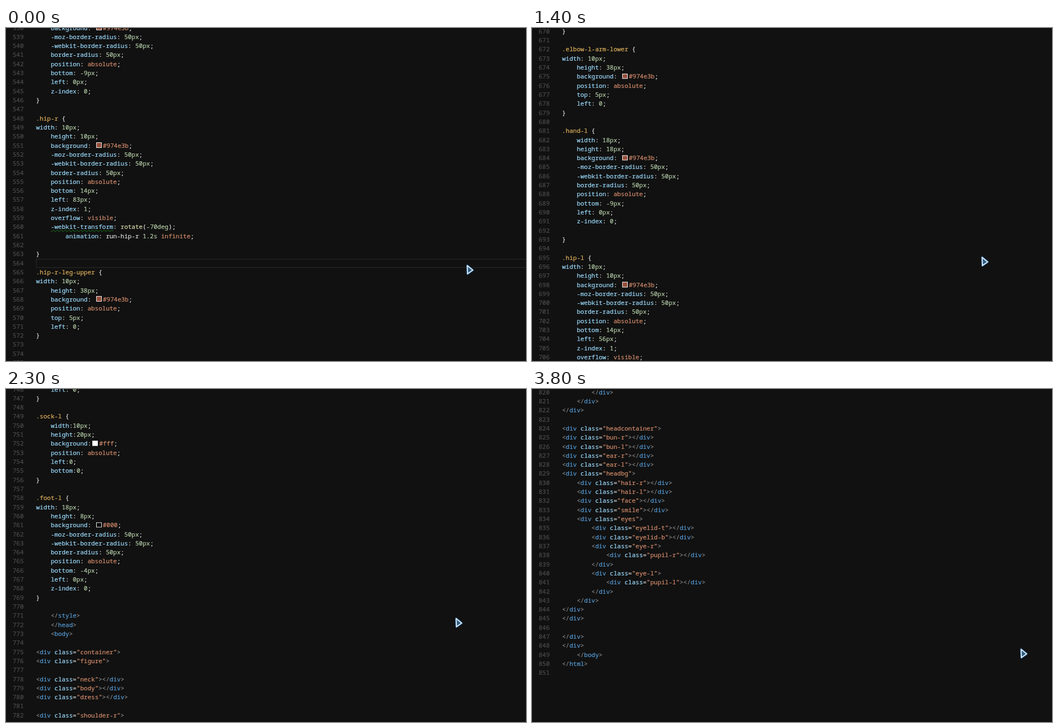
Animation of 934x600 px, one loop 3.9 s. Source, as an HTML page:

```html
<!DOCTYPE html>
<html>
<head>
<meta charset="utf-8">
<style>
html, body { margin: 0; width: 100%; height: 100%; overflow: hidden; background: #111; }
#stage { position: relative; width: 100%; height: 100%; overflow: clip; contain: strict; }
#code {
  position: absolute; left: 12px; right: 0; top: -8.5px;
  font: 500 11px "Noto Sans Mono", "DejaVu Sans Mono", monospace;
  color: #dcdcdc; white-space: pre; font-variant-ligatures: none;
  -webkit-text-stroke: .2px currentColor;
}
.row { position: relative; height: 16.314px; line-height: 16.314px; }
.no { display: inline-block; width: 42px; color: #4c4c4c; }
.current::after {
  content: ""; position: absolute; left: 42px; right: -2px; top: 0; bottom: 0;
  border: 1.5px solid #2a2a2a;
}
.sel { color: #e0b25c; }
.prop { color: #9cdcfe; }
.num { color: #b5cea8; }
.val { color: #d58d6c; }
.fn { color: #dcdcaa; }
.tag { color: #569cd6; }
.br { color: #808080; }
.warn { text-decoration: underline wavy #168016 1px; text-underline-offset: 1px; text-decoration-skip-ink: none; }
.chip {
  display: inline-block; box-sizing: border-box; width: 9.6px; height: 9.6px;
  margin: 0 2.4px; border: 1px solid #eee; vertical-align: 0;
}
#pointer { position: absolute; left: 0; top: 0; }
#pointer path { stroke-linejoin: round; }
</style>
</head>
<body>
<div id="stage">
  <div id="code"></div>
  <svg id="pointer" width="18" height="22">
    <path d="M2.5 3L12.5 11.3L3 18Z" fill="none" stroke="#1d4e7c" stroke-width="3.6"/>
    <path d="M2.5 3L12.5 11.3L3 18Z" fill="#2f5d80" stroke="#d3e8f8" stroke-width="2"/>
  </svg>
</div>
<script>
const FIRST = 538, CURRENT = 564, NOTCH = 42.932, LOOP = 3900, TICK = 100;

// Style sheet part of the document
const skin = 'background: #974e3b';
const round = ['-moz-border-radius: 50px', '-webkit-border-radius: 50px',
  'border-radius: 50px', 'position: absolute'];
const indent = s => s && '    ' + s + ';';
const rule = (name, first, ...rest) =>
  [`.${name} {`, first + ';', ...rest.map(indent), '}', ''];
const joint = (name, place, deg, pad = '') => rule(name, 'width: 10px', 'height: 10px', skin,
  ...round, ...place, 'overflow: visible', `-webkit-transform: rotate(${deg}deg)`,
  `${pad}animation: run-${name} 1.2s infinite`, '');
const limb = name => rule(name, 'width: 10px', 'height: 38px', skin,
  'position: absolute', 'top: 5px', 'left: 0');
const bend = ['bottom: -5px', 'left: 0px', 'z-index: 0'];
const palm = ['bottom: -9px', 'left: 0px', 'z-index: 0'];
const hip = x => ['bottom: 14px', `left: ${x}px`, 'z-index: 1'];
const leg = (s, x, hipDeg, kneeDeg) => [
  ...joint('hip-' + s, hip(x), hipDeg, '    '),
  ...limb(`hip-${s}-leg-upper`), '', '',
  ...joint('knee-' + s, bend, kneeDeg),
  ...limb(`knee-${s}-leg-lower`),
  ...rule('sock-' + s, '    width:10px', 'height:20px', 'background:#fff',
    'position: absolute', 'left:0', 'bottom:0'),
  ...rule('foot-' + s, 'width: 18px', 'height: 8px', 'background: #000', ...round,
    'bottom: -4px', 'left: 0px', 'z-index: 0')
];

// Markup part of the document
const open = name => `<div class="${name}">`;
const leaf = name => open(name) + '</div>';
const chain = (names, ...leaves) => {
  const pad = i => '    '.repeat(i);
  return [...names.map((n, i) => pad(i) + open(n)),
    ...leaves.map(n => pad(names.length) + leaf(n)),
    ...names.map((n, i) => pad(i) + '</div>').reverse()];
};
const armTags = s => [...chain(['shoulder-' + s, `shoulder-${s}-arm-upper`, 'elbow-' + s,
  `elbow-${s}-arm-lower`], 'hand-' + s), ''];
const legTags = s => [...chain(['hip-' + s, `hip-${s}-leg-upper`, 'knee-' + s,
  `knee-${s}-leg-lower`], 'sock-' + s, 'foot-' + s), ''];
const deeper = lines => lines.map(l => '    ' + l);

const css = [
  ...[skin, ...round, ...palm].map(indent), '}', '',
  ...leg('r', 83, -70, 0), '', '', '',
  ...joint('shoulder-l', ['top: 4px', 'left: 56px', 'z-index: 1'], -40),
  ...limb('shoulder-l-arm-upper'), '', '',
  ...joint('elbow-l', bend, 950),
  ...limb('elbow-l-arm-lower'),
  ...rule('hand-l', '    width: 18px', 'height: 18px', skin, ...round, ...palm, ''),
  ...leg('l', 56, 40, 97)
];
const html = [
  '    </style>', '    </head>', '    <body>', '',
  open('container'), open('figure'), '',
  leaf('neck'), leaf('body'), leaf('dress'), '',
  ...armTags('r'), ...armTags('l'), ...legTags('r'), ...legTags('l'),
  open('headcontainer'), ...['bun-r', 'bun-l', 'ear-r', 'ear-l'].map(leaf), open('headbg'),
  ...deeper([
    ...['hair-r', 'hair-l', 'face', 'smile'].map(leaf),
    open('eyes'),
    ...deeper([leaf('eyelid-t'), leaf('eyelid-b'),
      ...chain(['eye-r'], 'pupil-r'), ...chain(['eye-l'], 'pupil-l')]),
    '</div>'
  ]),
  '</div>', '</div>', '', '</div>', '</div>', '    </body>', '</html>', ''
];

// Syntax colours
const span = (cls, s) => `<span class="${cls}">${s}</span>`;
const paintValue = v => v.replace(/(#\w+)|(-?[\d.]+[a-z]*)|(absolute|visible|infinite)|(rotate)/g,
  (s, hex, num, word) => hex ? `<i class="chip" style="background:${hex}"></i>` + span('val', hex)
    : span(num ? 'num' : word ? 'val' : 'fn', s));
const paintCss = l => {
  if (l[0] === '.') return span('sel', l.slice(0, -2)) + ' {';
  return l.replace(/^(\s*)([\w-]+)(:\s*)(.*)$/, (_, pad, prop, colon, value) =>
    pad + span(prop === '-webkit-transform' ? 'prop warn' : 'prop', prop) + colon + paintValue(value));
};
const paintHtml = l => l.replace(/(<\/?|>)|("[^"]*")|(class)(?==)|(\w+)/g,
  (s, br, str, attr) => span(br ? 'br' : str ? 'val' : attr ? 'prop' : 'tag', s.replace('<', '&lt;')));

const code = document.getElementById('code'), pointer = document.getElementById('pointer');
code.innerHTML = [...css.map(paintCss), ...html.map(paintHtml)].map((l, i) => {
  const n = FIRST + i;
  return `<div class="row${n === CURRENT ? ' current' : ''}">${span('no', n)}${l}</div>`;
}).join('');

// Key points: tick, then wheel notches or pointer x and y
const wheel = [[0, 0], [4, 16], [10, 40], [14, 50], [19, 68], [28, 92], [36, 107]];
const path = [[0, 826, 425], [4, 804, 404], [10, 806, 410], [36, 806, 411], [38, 876, 466]];
const pauses = [3, 5, 9, 11, 15, 20, 22, 24, 26, 29, 31, 32, 37];

// Linear between key points, constant after the last
function at(keys, tick) {
  const i = keys.findIndex(k => k[0] > tick);
  if (i < 0) return keys[keys.length - 1].slice(1);
  const a = keys[i - 1], b = keys[i], p = (tick - a[0]) / (b[0] - a[0]);
  return a.slice(1).map((v, j) => v + (b[j + 1] - v) * p);
}

function draw() {
  let tick = Math.floor(performance.now() % LOOP / TICK);
  while (pauses.includes(tick)) tick--;
  const [notches] = at(wheel, tick), [x, y] = at(path, tick);
  code.style.transform = `translateY(${-Math.round(notches) * NOTCH}px)`;
  pointer.style.transform = `translate(${x}px, ${y}px)`;
  requestAnimationFrame(draw);
}
draw();
</script>
</body>
</html>
```
